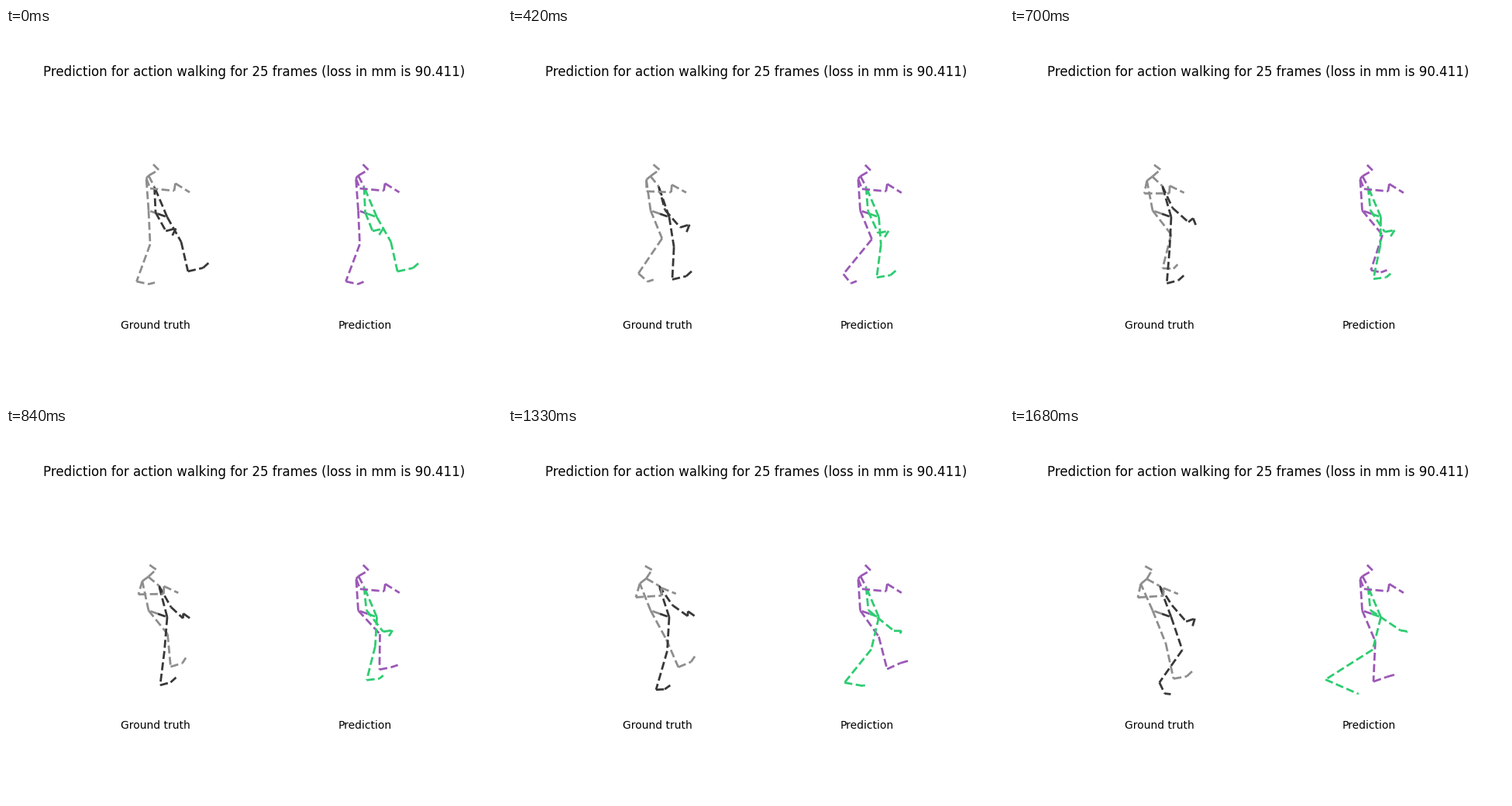
Animation, 640 px wide and 480 px high, one loop 1.75 s. Source, as a matplotlib script:

```python
import numpy as np
import matplotlib.pyplot as plt
from matplotlib.animation import FuncAnimation

W, H, DPI = 640, 480, 100
FRAMES, STEP = 25, 70
GAP = 270.5  # distance between the two walkers
n = np.arange(FRAMES)[:, None]


def bell(center, width):
    return np.exp(-((n - center) / width) ** 2)


def glide(start, *moves):
    """Start vector plus eased moves, each given as (from, to, dx, dy)."""
    p = np.tile(np.array(start, float), (FRAMES, 1))
    for n0, n1, dx, dy in moves:
        t = np.clip((n - n0) / (n1 - n0), 0, 1)
        p += t * t * (3 - 2 * t) * np.array([dx, dy])
    return p


# Slow backward drift, a short lean of the trunk, the raising of the left hand
drift = np.sin(np.pi * n / 42) ** 1.25
lean = bell(22, 4)
lift = bell(15.5, 5.5)


def sway(start, by_drift, by_lean):
    return np.array(start) + drift * np.array(by_drift) + lean * np.array(by_lean)


def hold(joints):
    """Keep the first pose, after a slight settling."""
    return [j[0] + glide((0, 0), (0, 4, 0.3, 0.7)) for j in joints]


def chain(*bones):
    """Joints of a limb: the first item is a place, the others are bone vectors."""
    return list(np.cumsum(bones, axis=0))


right_hip, left_hip = glide((184, 235.5)), glide((208, 244))

true_body = dict(
    right_leg=chain(
        right_hip,
        glide((2, 43.5), (0, 11, 22.5, -13), (13, 24, -7.5, 12)),
        glide((-17.5, 48), (0, 5, -13, -3), (6, 15, 46.5, -3), (11, 16, 0, -7), (18, 24, -6, 10.5)),
        glide((15.5, 3.5), (0, 4, -4, 9), (4, 15, 4.5, -21), (16, 24, 1, 5.5)),
        glide((8, -2), (4, 14, -4, -5.5), (16, 24, 3, 1))),
    left_leg=chain(
        left_hip,
        glide((18.4, 31.8), (-1, 12, -22, 12), (18, 25, 19, -1.5)),
        glide((11.5, 37), (-3, 8, -15, 5.5), (10, 17, -10, 8), (18, 25, -17, -9)),
        glide((19.5, -4.5), (2, 16, -7.5, 1), (17, 25, -5.5, 18.5)),
        glide((7, -6.3), (17, 25, 1, 7.5))),
    right_arm=[
        sway((181, 194), (-7, 5), (-7, 3)),
        sway((186, 207), (-20.5, 10.5), (-1.5, 2)),
        sway((217, 210), (-18.5, 5.5), (-1.5, 1.5)),
        sway((218.5, 200.5), (-20, 5), (-1.5, 1.5)),
        sway((237, 212), (-20, 1), (-1, 1.5))],
    left_arm=chain(
        sway((191.5, 205), (8, -2), (-8, 1)),
        sway((1.5, 33), (19, -7.5), (-5, -1)),
        np.hstack([17 + 5.5 * np.cos(2 * np.pi * (n - 8.2) / 13), 24 - 2 * drift - 12 * lift]),
        np.hstack([13 - 19 * lift, -3.5 - 4 * lift]),
        np.hstack([-5 + 23 * lift, 10 - 4 * lift])),
    head=[
        sway((184, 190.5), (-0.5, 2), (-9, 3)),
        sway((197, 183), (-4.5, -0.5), (-12, 1)),
        sway((190, 176), (-7, 0.5), (-12, 2))],
)

pred_body = dict(
    right_leg=chain(
        right_hip,
        glide((2, 43.5), (0, 12, 26, -13), (15, 25, -11.5, 9.5)),
        glide((-18, 48), (0, 5, -20, -3), (5, 16, 53.5, 1), (12, 16, 0, -8), (16, 25, -18.5, 14.5)),
        glide((15.5, 3.5), (0, 4, -6, 9), (5, 16, 7.5, -22), (16, 22, 0, 3.5)),
        glide((7.5, -3), (8, 16, 3, 0))),
    left_leg=chain(
        left_hip,
        glide((23.5, 30.5), (-4, 9, -24, 6), (9, 21, -10, 5.5)),
        glide((13.5, 37), (-4, 9, -22, 6), (9, 17, -8, 3), (14, 26, -48, -8)),
        glide((20, -4.5), (0, 10, -3.5, 2.5), (15, 27, 30, 24)),
        glide((7, -6), (4, 24, -6, 5.5))),
    right_arm=hold(true_body["right_arm"]),
    left_arm=chain(
        glide((191.5, 205)),
        glide((1.5, 33), (0, 10, 1.5, -3)),
        glide((9.5, 24), (0, 5, 0, 5), (0, 28, 31, -3)),
        glide((13.5, -3), (4, 28, -5.5, 4.5)),
        glide((-5, 8), (10, 24, 4.5, -6.5))),
    head=hold(true_body["head"]),
)

fig = plt.figure(figsize=(W / DPI, H / DPI), dpi=DPI, facecolor="white")
ax = fig.add_axes([0, 0, 1, 1])
ax.set(xlim=(0, W), ylim=(H, 0))
ax.axis("off")

ax.text(320, 62, "Prediction for action walking for 25 frames (loss in mm is 90.411)",
        ha="center", fontsize=12, family="DejaVu Sans")
for i, label in enumerate(("Ground truth", "Prediction")):
    ax.text(192.7 + i * GAP, 388, label, ha="center", fontsize=10, family="DejaVu Sans")

bones = []


def add_bones(joints, color, dx):
    for a, b in zip(joints, joints[1:]):
        line, = ax.plot([], [], "--", lw=2, color=color)
        bones.append((line, np.stack([a, b], axis=1) + [dx, 0]))


def add_walker(body, right, left, dx):
    right_arm, left_arm, head = body["right_arm"], body["left_arm"], body["head"]
    root = (right_hip + left_hip) / 2
    for joints, color in (
            (body["right_leg"], right),
            (body["left_leg"], left),
            ([root, right_hip], right),
            ([root, left_hip], left),
            ([left_hip] + left_arm, left),
            ([right_hip] + right_arm, right),
            ([head[0], right_arm[0]], right),
            ([head[0], left_arm[0]], right),
            (head, right)):
        add_bones(joints, color, dx)


add_walker(true_body, "#8e8e8e", "#383838", 0)
add_walker(pred_body, "#9b59b6", "#2ecc71", GAP)


def update(frame):
    for line, ends in bones:
        line.set_data(*ends[frame].T)
    return [line for line, _ in bones]


anim = FuncAnimation(fig, update, frames=FRAMES, interval=STEP, repeat=True, repeat_delay=0)
plt.show()
```
